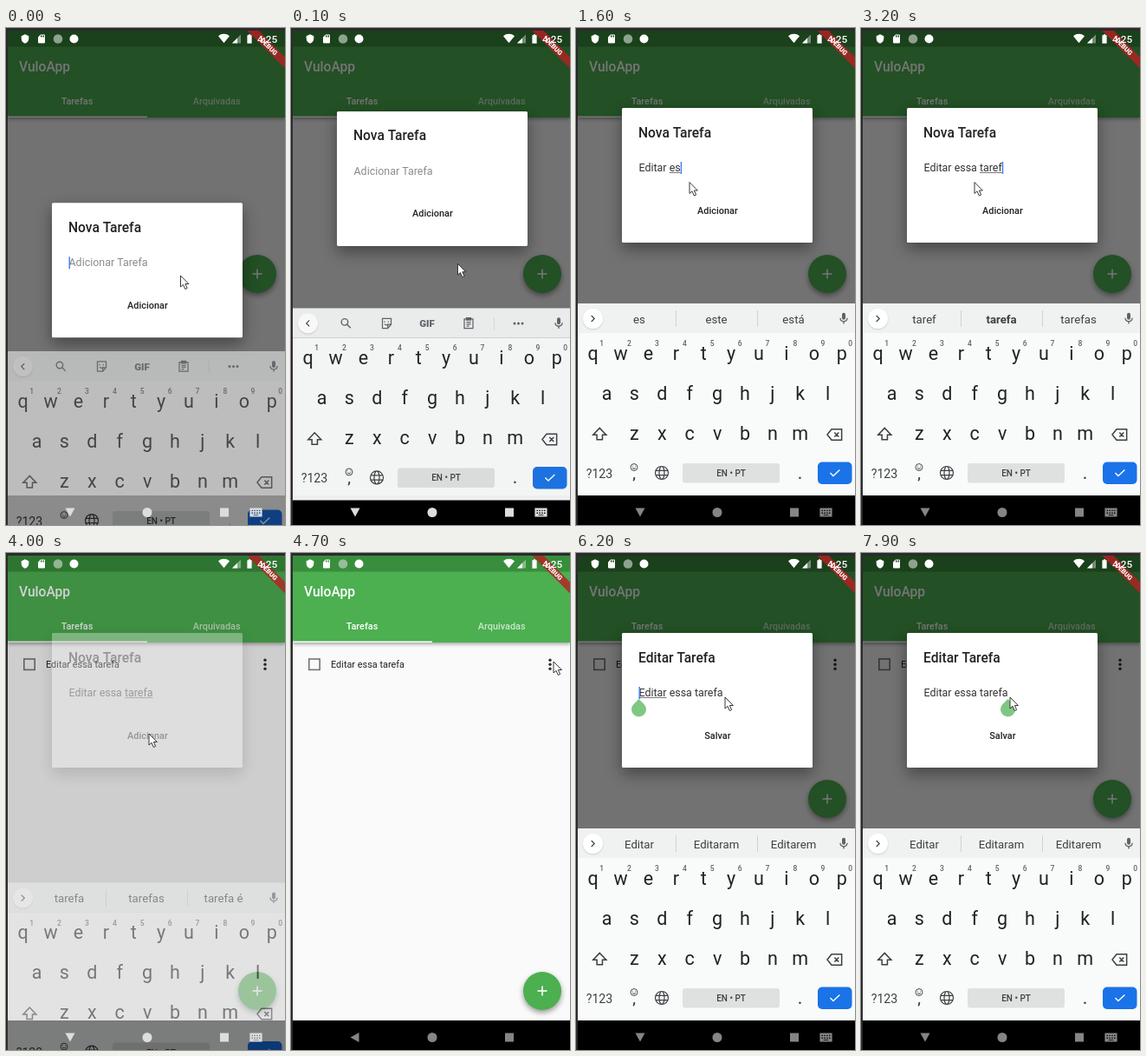
An HTML page with a canvas that plays this animation: 322 px wide and 572 px high, repeating every 8 s.

```html
<!DOCTYPE html>
<html lang="pt">
<head>
<meta charset="utf-8">
<title>Lista de tarefas</title>
<style>
  html, body { margin: 0; width: 100%; height: 100%; overflow: hidden; background: #2c2a2d; }
  canvas { display: block; width: 322px; height: 572px; }
</style>
</head>
<body>
<canvas></canvas>
<script>
const LOOP = 8000, GREEN = '#4caf50', INK = '#212121', KEY_INK = '#3c4043';
const canvas = document.querySelector('canvas'), buffer = document.createElement('canvas');
const ratio = window.devicePixelRatio || 1;
for (const c of [canvas, buffer]) {
  c.width = 322 * ratio;
  c.height = 572 * ratio;
}
const screen2d = canvas.getContext('2d'), buffer2d = buffer.getContext('2d');
let ctx = screen2d;

// Icons share a 24-unit box.
const ICONS = {
  shield: 'M12 1L3 5v6c0 5.5 3.8 10.7 9 12c5.2-1.3 9-6.5 9-12V5z',
  card: 'M18 2h-8L4 8v12a2 2 0 0 0 2 2h12a2 2 0 0 0 2-2V4a2 2 0 0 0-2-2zM12 8h-2V4h2zM15 8h-2V4h2zM18 8h-2V4h2z',
  wifi: 'M12 21.5L23.6 7A18.4 18.4 0 0 0 .4 7z',
  signal: 'M2 22h20V2z',
  signalPart: 'M2 22h12V10z',
  battery: 'M16 4h-2V2h-4v2H7v18h10V4z',
  mic: 'M12 14a3 3 0 0 0 3-3V5a3 3 0 0 0-6 0v6a3 3 0 0 0 3 3zM17 11a5 5 0 0 1-10 0H5a7 7 0 0 0 6 6.9V21h2v-3.1A7 7 0 0 0 19 11z',
  search: 'M15.5 9.5a6 6 0 1 1-12 0a6 6 0 1 1 12 0M14 14l6.5 6.5',
  sticker: 'M4 3h16v11l-6 7H4zM20 14h-6v7M8 8v2M15 8v2M8 13q3.5 4 7 0',
  clipboard: 'M4 4h16v17H4zM8 2h8v4H8zM8 10h8M8 13.5h8M8 17h5',
  globe: 'M22 12a10 10 0 1 1-20 0a10 10 0 1 1 20 0M16 12a4 10 0 1 1-8 0a4 10 0 1 1 8 0M3 8.5h18M3 15.5h18',
  shift: 'M12 3L2.5 13H8v7h8v-7h5.5z',
  backspace: 'M8 4.5h14v15H8L2 12zM12 9l6 6M18 9l-6 6',
  check: 'M4.5 12l5 5L20 7',
  smile: 'M22 12a10 10 0 1 1-20 0a10 10 0 1 1 20 0M8 8v2M16 8v2M7 14q5 6 10 0',
  left: 'M15 6l-6 6l6 6',
  right: 'M9 6l6 6l-6 6',
  keyboard: 'M2 5h20v14H2zM5 8v2h2V8zM9 8v2h2V8zM13 8v2h2V8zM17 8v2h2V8zM5 12v2h2v-2zM9 12v2h2v-2zM13 12v2h2v-2zM17 12v2h2v-2zM8 16v1h8v-1z'
};
for (const name in ICONS) ICONS[name] = new Path2D(ICONS[name]);

function scoped(draw) { ctx.save(); draw(); ctx.restore(); }

// Draws a group as one translucent picture.
function layer(alpha, draw) {
  ctx = buffer2d;
  ctx.setTransform(ratio, 0, 0, ratio, 0, 0);
  ctx.clearRect(0, 0, 322, 572);
  scoped(draw);
  ctx = screen2d;
  scoped(() => {
    ctx.globalAlpha = alpha;
    ctx.drawImage(buffer, 0, 0, 322, 572);
  });
}

function rect(x, y, w, h, color, radius = 0) {
  ctx.fillStyle = color;
  ctx.beginPath();
  ctx.roundRect(x, y, w, h, radius);
  ctx.fill();
}

function circle(x, y, r, color) {
  ctx.fillStyle = color;
  ctx.beginPath();
  ctx.arc(x, y, r, 0, 7);
  ctx.fill();
}

function polygon(points, color) {
  ctx.fillStyle = color;
  ctx.beginPath();
  points.forEach(([x, y]) => ctx.lineTo(x, y));
  ctx.closePath();
  ctx.fill();
}

function label(string, x, y, size, color, weight = 400, align = 'left') {
  ctx.font = `${weight} ${size}px Roboto, sans-serif`;
  ctx.textAlign = align;
  ctx.fillStyle = color;
  ctx.fillText(string, x, y);
}

// A line width of 0 fills the icon.
function icon(name, x, y, size, color, line = 0) {
  scoped(() => {
    ctx.translate(x - size / 2, y - size / 2);
    ctx.scale(size / 24, size / 24);
    ctx.fillStyle = ctx.strokeStyle = color;
    ctx.lineWidth = line;
    if (line) ctx.stroke(ICONS[name]); else ctx.fill(ICONS[name], 'evenodd');
  });
}

function shadowed(blur, offset, alpha, draw) {
  scoped(() => {
    ctx.shadowColor = `rgba(0,0,0,${alpha})`;
    ctx.shadowBlur = blur * ratio;
    ctx.shadowOffsetY = offset * ratio;
    draw();
  });
}

const clamp = v => Math.max(0, Math.min(1, v));
const ramp = (t, start, length) => clamp((t - start) / length);
const easeOut = v => 1 - (1 - v) ** 3;
const easeInOut = v => v * v * (3 - 2 * v);

const TASK = 'Editar essa tarefa';
const KEY_TIMES = [800, 900, 1000, 1100, 1200, 1300, 1400, 1500, 1600,
  1800, 2000, 2300, 2600, 2800, 3000, 3100, 3200, 3300];
// [typed letters, words]
const SUGGESTIONS = [
  [1, 'E', 'Eu', 'Ele'], [3, 'Edi', 'Edital', 'Edição'], [5, 'Edita', 'Editar', 'Editora'],
  [6, 'Editar', 'Editaram', 'Editarem'], [7, 'o', 'a', 'e'], [8, 'e', 'em', 'eu'],
  [9, 'es', 'este', 'está'], [10, 'ess', 'essa', 'esse'], [11, 'essa', 'essas', 'esse'],
  [12, 'semana', 'é', 'noite'], [13, 't', 'tarde', 'te'], [15, 'tar', 'tarde', 'tarefa'],
  [17, 'taref', 'tarefa', 'tarefas'], [18, 'tarefa', 'tarefas', 'tarefa é']
];
// [time, x, y]
const POINTER = [[0, 201.5, 285], [450, 131, 177.5], [3400, 131, 177.5], [3750, 165, 208], [4000, 165, 208],
  [4600, 303, 125], [4900, 303, 125], [5150, 262, 135], [5400, 262, 135], [5950, 172, 166], [LOOP, 172, 166]];

function pointerAt(t) {
  const i = POINTER.findIndex(p => p[0] > t);
  const [t0, x0, y0] = POINTER[i - 1], [t1, x1, y1] = POINTER[i];
  const k = easeInOut(ramp(t, t0, t1 - t0));
  return [x0 + (x1 - x0) * k, y0 + (y1 - y0) * k];
}

function drawApp(hasTask, fabY) {
  rect(2, 3, 320, 535, '#fafafa');
  shadowed(4, 2, .35, () => rect(2, 21, 320, 82, GREEN));
  rect(2, 3, 320, 18.5, '#388e3c');
  label('VuloApp', 15, 49.5, 15.6, '#fff', 500);
  label('Tarefas', 82, 87.5, 10.9, '#fff', 500, 'center');
  label('Arquivadas', 243.2, 87.5, 10.9, 'rgba(255,255,255,.7)', 500, 'center');
  rect(2, 101.4, 161, 1.6, '#fff');
  if (hasTask) {
    ctx.strokeStyle = '#757575';
    ctx.lineWidth = 1.6;
    ctx.strokeRect(20.8, 122, 12.4, 12.4);
    label(TASK, 46, 132, 10.9, INK);
    for (const y of [123.2, 128.2, 133.2]) circle(299, y, 1.7, '#333');
  }
  shadowed(6, 3, .4, () => circle(290, fabY, 22, GREEN));
  rect(284.5, fabY - .8, 11, 1.6, '#fff');
  rect(289.2, fabY - 5.5, 1.6, 11, '#fff');
}

function drawMenu(open) {
  if (!open) return;
  layer(open, () => {
    shadowed(8, 3, .35, () => rect(316 - 87 * open, 112, 87 * open, 87 * open, '#fff', 2));
    label('Editar', 241, 141, 12.4, INK);
    label('Arquivar', 241, 178, 12.4, INK);
  });
}

function drawDialog(state, t) {
  layer(state.shade, () => {
    shadowed(18, 7, .4, () => rect(53, state.top, 220, 155, '#fff', 1.6));
    ctx.translate(0, state.top - 92);
    label(state.title, 72, 125.5, 15.6, INK, 500);
    label(state.button, 163.4, 213.5, 10.9, INK, 500, 'center');
    const { text, caret, compose } = state;
    label(text || 'Adicionar Tarefa', 72.5, 165, 12.45, text ? '#333' : '#8c8c8c');
    const xOf = n => 72.5 + ctx.measureText(text.slice(0, n)).width;
    if (compose) rect(xOf(compose[0]), 166, xOf(compose[1]) - xOf(compose[0]), 1, '#777');
    const caretX = xOf(caret);
    if ((t - state.blinkStart) % 1000 < 500) rect(caretX, 154, 1.5, 14, '#4285f4');
    if (state.handle) {
      ctx.translate(caretX, 180);
      ctx.rotate(Math.PI / 4);
      rect(-8.5, -8.5, 17, 17, '#81c784', [0, 8.5, 8.5, 8.5]);
    }
  });
}

function drawStrip(words) {
  rect(2, 317, 320, 34, '#f0f2f2');
  shadowed(2, 1, .15, () => circle(19.5, 334.5, 11.5, '#fff'));
  icon(words ? 'right' : 'left', 19.5, 334.5, 14, KEY_INK, 2);
  icon('mic', 309, 334.5, 16, '#5f6368');
  if (words) {
    words.forEach((word, i) =>
      label(word, 73 + 89 * i, 339.5, 13.2, KEY_INK, word === 'tarefa' && i === 1 ? 700 : 400, 'center'));
    rect(115, 325, 1, 19, '#cfd3d6');
    rect(209, 325, 1, 19, '#cfd3d6');
  } else {
    icon('search', 63.5, 334.5, 15, '#5f6368', 2.2);
    icon('sticker', 110.5, 334.5, 15, '#5f6368', 2);
    label('GIF', 157, 338.5, 11.5, '#5f6368', 900, 'center');
    icon('clipboard', 205, 334.5, 15, '#5f6368', 2);
    rect(234, 328, 1, 14, '#d8dcdf');
    for (const x of [258, 262.5, 267]) circle(x, 334.5, 1.5, '#5f6368');
  }
}

function drawKeyboard(shown, words) {
  if (!shown) return;
  layer(shown, () => {
    ctx.translate(0, 124 * (1 - shown));
    rect(2, 351, 320, 187, '#f9fafa');
    drawStrip(words);
    ['qwertyuiop', 'asdfghjkl', 'zxcvbnm'].forEach((row, r) => {
      [...row].forEach((key, i) => {
        const x = [19.6, 35.5, 67.4][r] + 31.9 * i;
        label(key, x, 381.5 + 46 * r, 21.5, '#222', 400, 'center');
        if (!r) label((i + 1) % 10, x + 10, 366, 8.5, '#5f6368', 500, 'center');
      });
    });
    icon('shift', 27.3, 467.5, 19, KEY_INK, 1.9);
    icon('backspace', 298.3, 468, 20, KEY_INK, 1.8);
    label('?123', 27, 517.5, 14.2, KEY_INK, 400, 'center');
    icon('smile', 67, 505.5, 9.5, KEY_INK, 2.4);
    label(',', 67, 519, 17, KEY_INK, 500, 'center');
    icon('globe', 99, 512, 18, KEY_INK, 1.6);
    rect(123, 501, 112, 22.5, '#dfe1e1', 3);
    label('EN • PT', 179, 516, 10, KEY_INK, 500, 'center');
    label('.', 258.5, 519, 18, KEY_INK, 500, 'center');
    rect(279, 499.5, 39.5, 25.5, '#1a73e8', 5);
    icon('check', 298.7, 512, 17, '#fff', 2);
  });
}

function drawNavigation(keyboardOpen, moving) {
  const color = moving ? '#ddd' : '#858585';
  polygon(keyboardOpen ? [[68.5, 552.5], [79.5, 552.5], [74, 562.5]]
    : [[78.5, 552], [78.5, 563], [68.5, 557.5]], color);
  circle(163, 557.5, 5.5, color);
  rect(247, 552.5, 10, 10, color);
  if (keyboardOpen) icon('keyboard', 288.5, 557.5, 17, color);
}

function drawStatus() {
  scoped(() => {
    ctx.beginPath();
    ctx.rect(2, 3, 320, 100);
    ctx.clip();
    ctx.translate(322, 3);
    ctx.rotate(Math.PI / 4);
    rect(-31, 21.5, 62, 9.3, 'rgba(183,32,36,.8)');
    label('DEBUG', 0, 28.9, 7.6, '#fff', 900, 'center');
  });
  icon('shield', 22, 12.5, 11.5, '#fff');
  icon('card', 41, 12.5, 12, '#fff');
  circle(60, 12.5, 5.3, 'rgba(205,215,205,.65)');
  circle(78.5, 12.5, 5, '#fff');
  icon('wifi', 251.5, 12, 13.5, '#fff');
  icon('signal', 266, 12.5, 12, 'rgba(255,255,255,.4)');
  icon('signalPart', 266, 12.5, 12, '#fff');
  icon('battery', 281, 12.5, 12.5, '#fff');
  label('4:25', 290, 16.5, 11.8, '#fff', 500);
}

function drawPointer([x, y]) {
  scoped(() => {
    ctx.translate(x, y);
    polygon([[0, 0], [0, 13], [3, 10.3], [5.3, 15.5], [7.6, 14.5], [5.4, 9.5], [9.4, 9.5]], '#fff');
    ctx.strokeStyle = '#222';
    ctx.lineWidth = .9;
    ctx.stroke();
  });
}

function stateAt(t) {
  const editing = t >= 4800;
  const insetTime = editing ? 5600 : 0;
  const state = {
    shade: editing ? ramp(t, 5350, 150) : 1 - ramp(t, 3900, 150),
    keyboard: editing ? ramp(t, 5470, 230) : ramp(t, -138, 250) * (1 - ramp(t, 3900, 200)),
    top: 203.5 - 111.5 * easeOut(ramp(t, insetTime, 150)),
    inset: editing ? t >= insetTime : t < 3950
  };
  if (editing) {
    const atEnd = t >= 7700;
    return Object.assign(state, {
      title: 'Editar Tarefa', button: 'Salvar', text: TASK,
      caret: atEnd ? TASK.length : 0, compose: t >= 5900 && !atEnd && [0, 6],
      handle: t >= 6100, blinkStart: t < 6100 ? 5500 : 6100,
      words: t >= 5900 && ['Editar', 'Editaram', 'Editarem']
    });
  }
  const count = KEY_TIMES.filter(time => time <= t).length;
  const text = TASK.slice(0, count);
  const entry = SUGGESTIONS.filter(s => s[0] <= count).pop();
  return Object.assign(state, {
    title: 'Nova Tarefa', button: 'Adicionar', text, caret: count,
    compose: [text.lastIndexOf(' ') + 1, count],
    blinkStart: count ? KEY_TIMES[count - 1] : -400,
    words: entry && entry.slice(1)
  });
}

function draw(t) {
  const state = stateAt(t);
  ctx.setTransform(ratio, 0, 0, ratio, 0, 0);
  rect(0, 0, 322, 572, '#2c2a2d');
  drawApp(t >= 3900, state.inset ? 283 : 504);
  drawMenu(easeOut(ramp(t, 4800, 200)) * (1 - ramp(t, 5250, 120)));
  rect(2, 3, 320, 535, `rgba(0,0,0,${.54 * state.shade})`);
  if (state.shade) drawDialog(state, t);
  rect(2, 538, 320, 34, '#000');
  drawKeyboard(state.keyboard, state.words);
  drawNavigation(state.keyboard > 0, state.keyboard > 0 && state.keyboard < 1);
  drawStatus();
  drawPointer(pointerAt(t));
}

const start = performance.now();
function tick() {
  draw((performance.now() - start) % LOOP);
  requestAnimationFrame(tick);
}
tick();
</script>
</body>
</html>
```
